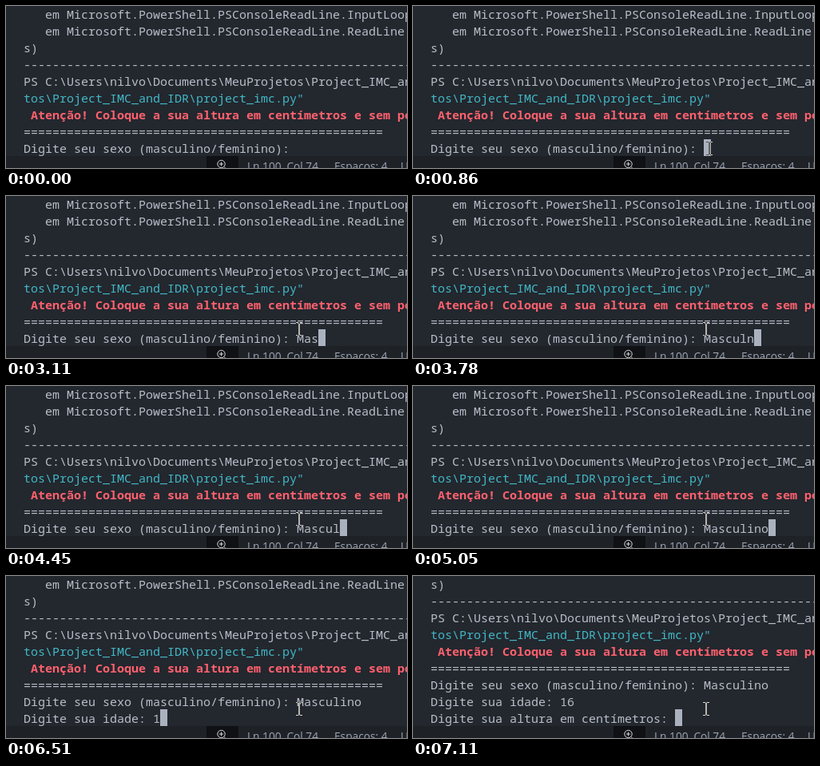
These frames come from a looping animation (502 by 203 pixels, 8000 ms). An HTML page:

```html
<!DOCTYPE html>
<html lang="pt">
<head>
<meta charset="utf-8">
<style>
html, body { margin: 0; width: 100%; height: 100%; overflow: hidden; background: #23272e; }
#stage { position: absolute; width: 502px; height: 203px; overflow: hidden; background: #23272e; }
#stage > * { position: absolute; }
pre { left: 22px; top: 0; margin: 0; font: 300 15px/21px "Noto Sans Mono", monospace; color: #b8bec9; font-variant-ligatures: none; }
.path { color: #42b8c6; }
.warn { color: #ff616e; font-weight: bold; }
#block { width: 9px; height: 21px; background: #abb2bf; }
#bar { left: 0; top: 188px; width: 502px; height: 15px; background: #1e2227; }
#bar span { position: absolute; top: 3px; font: 13.7px/19px "Open Sans", sans-serif; color: #9da5b4; white-space: pre; }
#zoom { left: 251px; top: 188px; }
#click { left: 357px; top: 165px; width: 24px; height: 24px; border-radius: 50%; background: rgba(255, 255, 0, .47); }
#mouse { left: -4px; top: -8px; mix-blend-mode: difference; }
</style>
</head>
<body>
<div id="stage">
  <pre id="term"></pre>
  <div id="block"></div>
  <div id="bar">
    <span style="left:302px">Ln 100, Col 74</span>
    <span style="left:411px">Espaços: 4</span>
    <span style="left:494px">UTF-8</span>
  </div>
  <svg id="zoom" width="40" height="15" fill="none" stroke="#d5d8dd">
    <rect width="40" height="15" fill="#0f1114" stroke="none"/>
    <circle cx="18.5" cy="10" r="4.7"/>
    <path d="M16 10h5M18.5 7.5v5M22 13.5l4 4"/>
  </svg>
  <div id="click"></div>
  <svg id="mouse" width="8" height="17" fill="none" stroke="#fff">
    <path d="M0 .5h3l1 1 1-1h3M0 16.5h3l1-1 1 1h3"/>
    <path d="M4 1v15" stroke-width="1.6"/>
  </svg>
</div>
<script>
const LOOP = 8000, ROWS = 9, CHAR = 9, LEFT = 22, BOTTOM = 167;
const $ = id => document.getElementById(id);

const history = [
  '   em Microsoft.PowerShell.PSConsoleReadLine.InputLoop',
  '   em Microsoft.PowerShell.PSConsoleReadLine.ReadLine(',
  's)',
  '-'.repeat(54),
  'PS C:\\Users\\nilvo\\Documents\\MeuProjetos\\Project_IMC_and',
  '<span class="path">tos\\Project_IMC_and_IDR\\project_imc.py"</span>',
  '<span class="warn"> Atenção! Coloque a sua altura em centímetros e sem po</span>',
  '='.repeat(50)
];

// Each prompt: text, start time, and [time, typed text] pairs
const prompts = [
  ['Digite seu sexo (masculino/feminino): ', 0, [
    [2640, 'M'], [2910, 'Ma'], [3110, 'Mas'], [3310, 'Masc'], [3380, 'Mascu'],
    [3720, 'Mascul'], [3780, 'Masculn'], [4050, 'Masculno'],
    [4320, 'Masculn'], [4450, 'Mascul'],
    [4720, 'Masculi'], [4920, 'Masculin'], [5050, 'Masculino']]],
  ['Digite sua idade: ', 5390, [[6510, '1'], [6980, '16']]],
  ['Digite sua altura em centímetros: ', 7110, []]
];

// Pointer path: time, x, y
const path = [
  [120, 476, 196], [270, 432, 173], [420, 396, 159], [560, 377, 167], [650, 371, 178],
  [1510, 371, 178], [1850, 367, 166], [LOOP, 367, 166]
];

function pointer(t) {
  const i = Math.max(1, path.findIndex(p => p[0] > t));
  const [a, b] = [path[i - 1], path[i]];
  const k = (t - a[0]) / (b[0] - a[0]);
  return [1, 2].map(n => Math.round(a[n] + (b[n] - a[n]) * k));
}

function show(el, on) { el.style.visibility = on ? 'visible' : 'hidden'; }
function move(el, x, y) { el.style.transform = `translate(${x}px, ${y}px)`; }

let shown = '';
function draw(now) {
  const t = now % LOOP;
  const input = prompts.filter(p => t >= p[1]).map(([label, , keys]) =>
    label + keys.reduce((text, [at, typed]) => t >= at ? typed : text, ''));
  const text = [...history, ...input].slice(-ROWS).join('\n');
  if (text !== shown) $('term').innerHTML = shown = text;

  move($('block'), LEFT + CHAR * input[input.length - 1].length, BOTTOM);
  show($('block'), t >= 860);
  show($('click'), t >= 720 && t < 860);
  show($('mouse'), t >= 120);
  if (t >= 120) move($('mouse'), ...pointer(t));
  requestAnimationFrame(draw);
}
requestAnimationFrame(draw);
</script>
</body>
</html>
```
